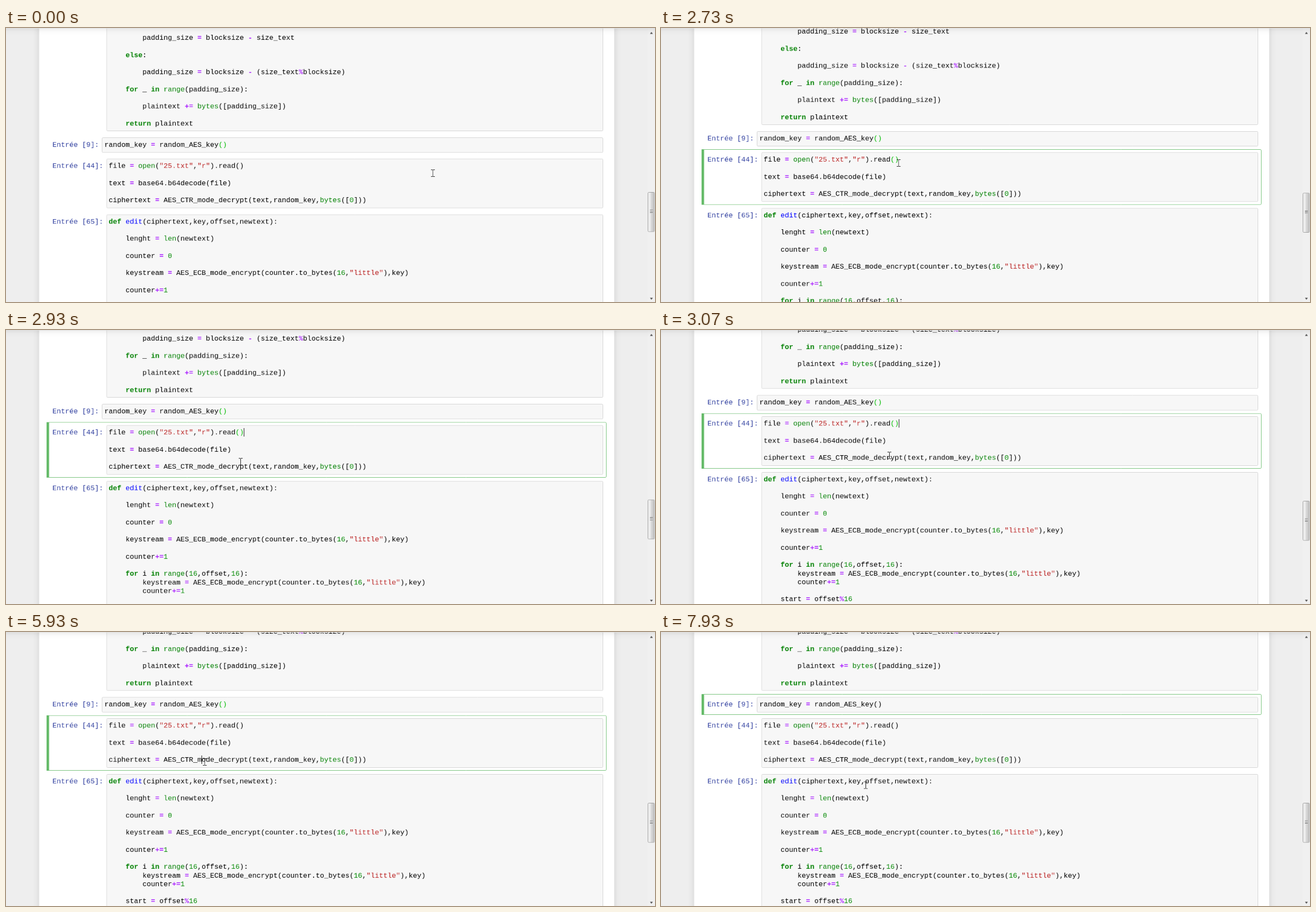
An HTML page with a canvas that plays this animation: 1152 px wide and 486 px high, repeating every 8000 ms.

```html
<!DOCTYPE html>
<html lang="fr">
<head>
<meta charset="utf-8">
<title>Notebook</title>
<style>
  html, body { margin: 0; width: 100%; height: 100%; overflow: hidden; background: #eee; }
  canvas { display: block; }
</style>
</head>
<body>
<canvas id="stage" width="1152" height="486"></canvas>
<script>
// The desktop is drawn at full size, then scaled down to the stage.
const SCALE = 0.75, W = 1536, H = 648;
const view = document.getElementById('stage').getContext('2d');
view.imageSmoothingQuality = 'high';
const screen = document.createElement('canvas');
screen.width = W;
screen.height = H;
const ctx = screen.getContext('2d');

const LOOP = 8000, STEP = 1000 / 15;
const ADV = 10, LINE = 20.24, RIGHT = 1413;
const FONT = '16.7px "Liberation Mono", "Courier New", monospace';

// Cells in page coordinates; top and bottom are the input box.
const cells = [
  { left: 238, x: 243, top: -80, bottom: 244, base: 28.3, code: `        padding_size = blocksize - size_text

    else:

        padding_size = blocksize - (size_text%blocksize)

    for _ in range(padding_size):

        plaintext += bytes([padding_size])

    return plaintext` },
  { left: 227, x: 233, top: 259, bottom: 295, base: 281, label: 'Entrée [9]:', frame: [252, 301],
    code: 'random_key = random_AES_key()' },
  { left: 238, x: 243, top: 309, bottom: 426, base: 331.4, label: 'Entrée [44]:', frame: [302, 433],
    code: `file = open("25.txt","r").read()

text = base64.b64decode(file)

ciphertext = AES_CTR_mode_decrypt(text,random_key,bytes([0]))` },
  { left: 238, x: 243, top: 441, bottom: 900, base: 463, label: 'Entrée [65]:',
    code: `def edit(ciphertext,key,offset,newtext):

    lenght = len(newtext)

    counter = 0

    keystream = AES_ECB_mode_encrypt(counter.to_bytes(16,"little"),key)

    counter+=1

    for i in range(16,offset,16):
        keystream = AES_ECB_mode_encrypt(counter.to_bytes(16,"little"),key)
        counter+=1

    start = offset%16` }
];

// Token styles in the order of the groups in the pattern.
const TOKEN = /("[^"]*")|\b(def|else|for|in|return)\b|\b(range|len|open|bytes)\b|\b(\d+)\b|([=+\-%]+)|\b(edit)\b/g;
const STYLES = [['#ba2121'], ['#008000', 1], ['#008000'], ['#008800'], ['#aa22ff', 1], ['#0000ff']];

// Turns a line into characters with colour and weight.
function parse(line) {
  const chars = [...line].map(ch => ({ ch, color: '#000', bold: 0 }));
  for (const m of line.matchAll(TOKEN)) {
    const [color, bold] = STYLES[m.slice(1).findIndex(Boolean)];
    for (let i = 0; i < m[0].length; i++) Object.assign(chars[m.index + i], { color, bold });
  }
  return chars;
}
for (const c of cells) c.lines = c.code.split('\n').map(parse);
const baseline = (cell, row) => Math.round(cell.base + row * LINE);

// Keys are [step, value...], linear in between; pointer places are stage pixels.
const pointer = [
  [3, 757, 257], [5, 566, 219], [7, 566, 219], [11, 459, 218], [12, 459, 218],
  [13, 450, 200], [14, 454, 185], [17, 454, 185], [20, 429, 227], [23, 429, 227],
  [26, 431, 240], [35, 431, 240], [38, 421, 240], [43, 421, 239], [46, 405, 222],
  [50, 402, 206], [56, 402, 206], [60, 403, 198], [64, 372, 232], [69, 372, 232],
  [70, 352, 230], [95, 352, 230], [107, 343, 129], [115, 343, 129], [119, 363, 271]
];
const scrolling = [[40, 0], [41, 15], [43, 66], [44, 84], [45, 97], [46, 105]];

function track(keys, n) {
  const i = keys.findIndex(k => k[0] > n);
  if (i < 0) return keys[keys.length - 1].slice(1);
  if (i === 0) return keys[0].slice(1);
  const a = keys[i - 1], b = keys[i], u = (n - a[0]) / (b[0] - a[0]);
  return a.slice(1).map((v, j) => Math.round(v + (b[j + 1] - v) * u));
}

// Clicks: from a step on, the caret sits at cell, row, column.
const clicks = [
  { at: 28, cell: 2, row: 0, col: 32, match: [30, 31], on: [[28, 36], [44, 52]] },
  { at: 60, cell: 2, row: 2, col: 29, match: [23, 28], on: [[60, 68]] },
  { at: 72, cell: 2, row: 4, col: 22, match: [], on: [[72, 81], [89, 97], [105, 108]] },
  { at: 108, cell: 1, row: 0, col: 22, match: [], on: [[108, 116]] }
];

function rect(x, y, w, h, color) {
  ctx.fillStyle = color;
  ctx.fillRect(x, y, w, h);
}

function roundBox(x, y, w, h, r, fill, stroke) {
  ctx.beginPath();
  ctx.roundRect(x + 0.5, y + 0.5, w - 1, h - 1, r);
  if (fill) { ctx.fillStyle = fill; ctx.fill(); }
  ctx.lineWidth = 1;
  ctx.strokeStyle = stroke;
  ctx.stroke();
}

function poly(points, fill, stroke) {
  ctx.beginPath();
  points.forEach(([x, y]) => ctx.lineTo(x, y));
  ctx.closePath();
  ctx.fillStyle = fill;
  ctx.fill();
  if (stroke) { ctx.strokeStyle = stroke; ctx.lineWidth = 1; ctx.stroke(); }
}

function shadowed(x, y, w, h, color) {
  ctx.save();
  ctx.shadowColor = 'rgba(87,87,87,0.2)';
  ctx.shadowBlur = 14.4;
  rect(x, y, w, h, color);
  ctx.restore();
}

function write(chars, x, y, marked) {
  chars.forEach(({ ch, color, bold }, i) => {
    if (ch === ' ') return;
    ctx.font = (bold ? 'bold ' : '') + FONT;
    ctx.fillStyle = marked && marked.includes(i) ? '#00bb00' : color;
    ctx.fillText(ch, x + i * ADV, y);
  });
}

function drawCell(cell, selected, matches) {
  if (selected) {
    const [top, end] = cell.frame;
    roundBox(96, top, 1325, end - top, 2, null, '#66bb6a');
    rect(96, top, 6, end - top, '#66bb6a');
  }
  roundBox(cell.left, cell.top, RIGHT - cell.left, cell.bottom - cell.top, 2, '#f7f7f7', '#cfcfcf');
  if (cell.label) {
    write([...cell.label].map(ch => ({ ch, color: '#303f9f' })), 110, baseline(cell, 0));
  }
  cell.lines.forEach((line, row) => write(line, cell.x, baseline(cell, row), matches[row]));
}

function drawScrollbar(scroll) {
  rect(1519, 1, 17, H - 1, '#f0f0f0');
  poly([[1524, 14], [1527.5, 9.5], [1531, 14]], '#505050');
  poly([[1524, 638], [1527.5, 642.5], [1531, 638]], '#505050');
  const y = 388 + Math.round(scroll * 0.153);
  const shade = ctx.createLinearGradient(1519, 0, 1535, 0);
  shade.addColorStop(0, '#f3f3f3');
  shade.addColorStop(0.45, '#e6e6e6');
  shade.addColorStop(0.5, '#d6d6d6');
  shade.addColorStop(1, '#c4c4c4');
  roundBox(1519, y, 16, 94, 2, shade, '#979797');
  for (let i = 0; i < 3; i++) {
    rect(1524, y + 42 + i * 3, 7, 1, '#555');
    rect(1524, y + 43 + i * 3, 7, 1, '#f4f4f4');
  }
}

function drawPointer(x, y, overText) {
  if (overText) {
    for (const dy of [-8, 8]) {
      rect(x - 4, y + dy, 4, 1, '#000');
      rect(x + 1, y + dy, 4, 1, '#000');
    }
    rect(x, y - 7, 1, 15, '#000');
    return;
  }
  const shape = [[0, 0], [0, 16], [3.6, 12.6], [6.4, 18.6], [8.6, 17.6], [6, 11.8], [11, 11.8]];
  poly(shape.map(([dx, dy]) => [x + 0.5 + dx, y + 0.5 + dy]), '#fff', '#000');
}

function draw(n) {
  const [scroll] = track(scrolling, n);
  const [px, py] = track(pointer, n).map(v => Math.round((v + 0.5) / SCALE - 0.5));
  const click = clicks.filter(c => c.at <= n).pop();

  rect(0, 0, W, H, '#eee');
  shadowed(78, -60, 1362, H + 120, '#eee');
  rect(79, 0, 1360, H, '#fff');

  ctx.save();
  ctx.translate(0, -scroll);
  cells.forEach((cell, i) => {
    const matches = {};
    if (i === 1 && n < 108) matches[0] = [27, 28];
    if (click && click.cell === i) matches[click.row] = click.match;
    drawCell(cell, click && click.cell === i, matches);
  });
  if (click && click.on.some(([a, b]) => n >= a && n < b)) {
    const cell = cells[click.cell];
    rect(cell.x + click.col * ADV, baseline(cell, click.row) - 15, 1, 20, '#000');
  }
  ctx.restore();

  drawScrollbar(scroll);
  shadowed(-30, -60, W + 60, 61, '#e0e0e0');
  const pageY = py + scroll;
  drawPointer(px, py, cells.some(c => pageY >= c.top && pageY < c.bottom));
  view.drawImage(screen, 0, 0, W * SCALE, H * SCALE);
}

let shown = -1;
const start = performance.now();
function tick() {
  const t = (performance.now() - start) % LOOP;
  const n = Math.min(119, Math.floor((t + 5) / STEP));
  if (n !== shown) draw(shown = n);
  requestAnimationFrame(tick);
}
tick();
</script>
</body>
</html>
```
